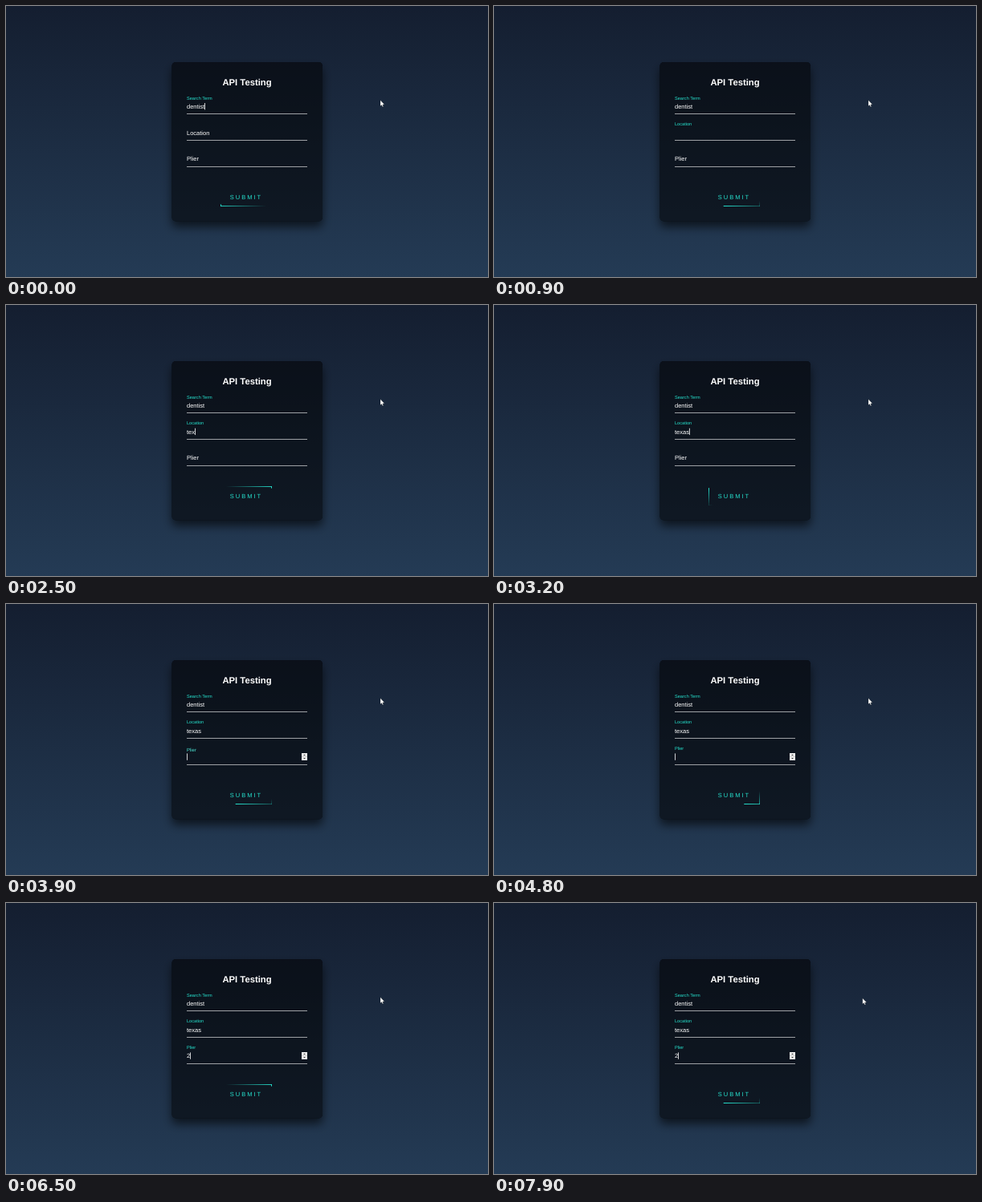
Write an HTML page with a canvas that moves like this. It is 600 px wide and 338 px high and loops after 8 s.

```html
<!DOCTYPE html>
<html lang="en">
<head>
<meta charset="utf-8">
<title>API Testing form</title>
<style>
  html, body { margin: 0; width: 100%; height: 100%; overflow: hidden; background: #141e30; }
  canvas { display: block; width: 600px; height: 338px; }
</style>
</head>
<body>
<canvas id="stage"></canvas>
<script>
const W = 600, H = 338, LOOP = 8000, STEP = 100;
const FONT = '"Liberation Sans", Arial, sans-serif';
const WHITE = '#ffffff';
const teal = a => `rgba(38, 226, 206, ${a})`;

const canvas = document.getElementById('stage');
const ratio = window.devicePixelRatio || 1;
canvas.width = W * ratio;
canvas.height = H * ratio;
const ctx = canvas.getContext('2d');
ctx.scale(ratio, ratio);
ctx.textRendering = 'geometricPrecision';

const LEFT = 225, FIELD_W = 150;
const BLINK = 530;
const BUTTON = { x: 267, y: 226, w: 64, h: 24 };

// Each key is [time, value]; a field has the caret from focus until blur.
const fields = [
  { label: 'Search Term', base: 127.8, focus: -5000, blur: 300, keys: [[-100, 'dentist']] },
  { label: 'Location', base: 160.5, focus: 300, blur: 3640,
    keys: [[1400, 't'], [1700, 'te'], [2300, 'tex'], [2800, 'texa'], [3000, 'texas']] },
  { label: 'Plier', base: 193.2, focus: 3640, blur: Infinity, keys: [[5320, '2']] }
];

const clamp = v => Math.max(0, Math.min(1, v));
const mix = (a, b, k) => a + (b - a) * k;

// CSS "ease": cubic-bezier(.25, .1, .25, 1)
function ease(x) {
  if (x <= 0 || x >= 1) return clamp(x);
  const curve = (a, b, s) => 3 * a * s * (1 - s) ** 2 + 3 * b * s * s * (1 - s) + s ** 3;
  let lo = 0, hi = 1;
  for (let i = 0; i < 20; i++) {
    const mid = (lo + hi) / 2;
    if (curve(.25, .25, mid) < x) lo = mid; else hi = mid;
  }
  return curve(.1, 1, lo);
}

function text(str, x, y, size, color, { weight = '', align = 'left', spacing = 0 } = {}) {
  ctx.font = `${weight} ${size}px ${FONT}`;
  ctx.textAlign = align;
  ctx.letterSpacing = spacing + 'px';
  ctx.fillStyle = color;
  ctx.fillText(str, x, y);
}

function rect(x, y, w, h, color) {
  ctx.fillStyle = color;
  ctx.fillRect(x, y, w, h);
}

function poly(points, color) {
  ctx.beginPath();
  points.forEach(([x, y]) => ctx.lineTo(x, y));
  ctx.closePath();
  ctx.fillStyle = color;
  ctx.fill();
}

function drawBackdrop() {
  const g = ctx.createLinearGradient(0, 0, 0, H);
  g.addColorStop(0, '#141e30');
  g.addColorStop(1, '#243b55');
  rect(0, 0, W, H, g);
}

function drawCard() {
  const card = new Path2D();
  card.roundRect(206.5, 70, 187.5, 198.5, 4.7);
  const outside = new Path2D();
  outside.rect(0, 0, W, H);
  outside.addPath(card);

  ctx.save();
  ctx.clip(outside, 'evenodd');
  ctx.shadowColor = 'rgba(0, 0, 0, .6)';
  ctx.shadowBlur = 11.7 * ratio;
  ctx.shadowOffsetY = 7 * ratio;
  ctx.fillStyle = '#000';
  ctx.fill(card);
  ctx.restore();

  ctx.fillStyle = 'rgba(0, 0, 0, .54)';
  ctx.fill(card);
  text('API Testing', 300, 99.3, 11.25, WHITE, { weight: 'bold', align: 'center' });
}

function drawSpinner(y) {
  rect(368, y, 7, 9, '#f0f0f0');
  rect(368, y + 4.2, 7, .6, '#b4b4b4');
  poly([[370.2, y + 3], [371.5, y + 1.4], [372.8, y + 3]], '#333');
  poly([[370.2, y + 6], [371.5, y + 7.6], [372.8, y + 6]], '#333');
}

function drawField(f, t) {
  rect(LEFT, Math.round(f.base + 6.3), FIELD_W, 1, 'rgba(255, 255, 255, .6)');

  const lift = ease((t - f.focus) / 500);
  text(f.label, LEFT, mix(f.base, f.base - 11.2, lift), mix(7.5, 5.625, lift),
       lift > 0 ? `rgb(${mix(255, 38, lift)}, ${mix(255, 226, lift)}, ${mix(255, 206, lift)})` : WHITE);

  const typed = f.keys.filter(k => k[0] <= t).pop();
  const value = typed ? typed[1] : '';
  text(value, LEFT, f.base, 7.5, WHITE);

  if (t < f.focus || t >= f.blur) return;
  const since = t - (typed ? typed[0] : f.focus);
  if (since % (2 * BLINK) < BLINK) {
    const x = LEFT + ctx.measureText(value).width;
    rect(x, f.base - 6.8, .8, 8.4, WHITE);
  }
  if (f.label === 'Plier') drawSpinner(f.base - 7.2);
}

// A glowing strip that fades from its tail to its head.
function strip(x, y, w, h, tail, head) {
  const g = ctx.createLinearGradient(...tail, ...head);
  g.addColorStop(0, teal(0));
  g.addColorStop(1, teal(1));
  rect(x, y, w, h, g);
}

function drawButton(t) {
  const { x, y, w, h } = BUTTON;
  const phase = t / 1000 + .777;
  const shift = delay => Math.min(1, ((phase - delay + 1) % 1) * 2) * 2 - 1;
  const right = x + shift(0) * w, down = y + shift(.25) * h;
  const left = x - shift(.5) * w, up = y - shift(.75) * h;

  ctx.save();
  ctx.beginPath();
  ctx.rect(x, y, w, h);
  ctx.clip();
  strip(right, y, w, 1, [right, 0], [right + w, 0]);
  strip(x + w - 1, down, 1, h, [0, down], [0, down + h]);
  strip(left, y + h - 1, w, 1, [left + w, 0], [left, 0]);
  strip(x, up, 1, h, [0, up + h], [0, up]);
  ctx.restore();

  text('SUBMIT', 278.8, 240.5, 7.5, teal(1), { spacing: 2 });
}

function drawPointer(t) {
  const k = clamp((t - 7700) / 200) ** 2;
  const x = mix(466, 458.8, k), y = mix(117.6, 118.8, k);
  const shape = [[0, 0], [0, 7.2], [1.6, 5.8], [2.7, 8.2], [3.8, 7.7], [2.8, 5.4], [5, 5.2]];
  poly(shape.map(([dx, dy]) => [x + dx, y + dy]), WHITE);
  ctx.strokeStyle = 'rgba(0, 0, 0, .55)';
  ctx.lineWidth = .4;
  ctx.stroke();
}

function draw(t) {
  drawBackdrop();
  drawCard();
  fields.forEach(f => drawField(f, t));
  drawButton(t);
  drawPointer(t);
}

let start;
function tick(now) {
  start ??= now;
  const t = (now - start) % LOOP;
  draw(Math.floor(t / STEP) * STEP);
  requestAnimationFrame(tick);
}
draw(0);
requestAnimationFrame(tick);
</script>
</body>
</html>
```
